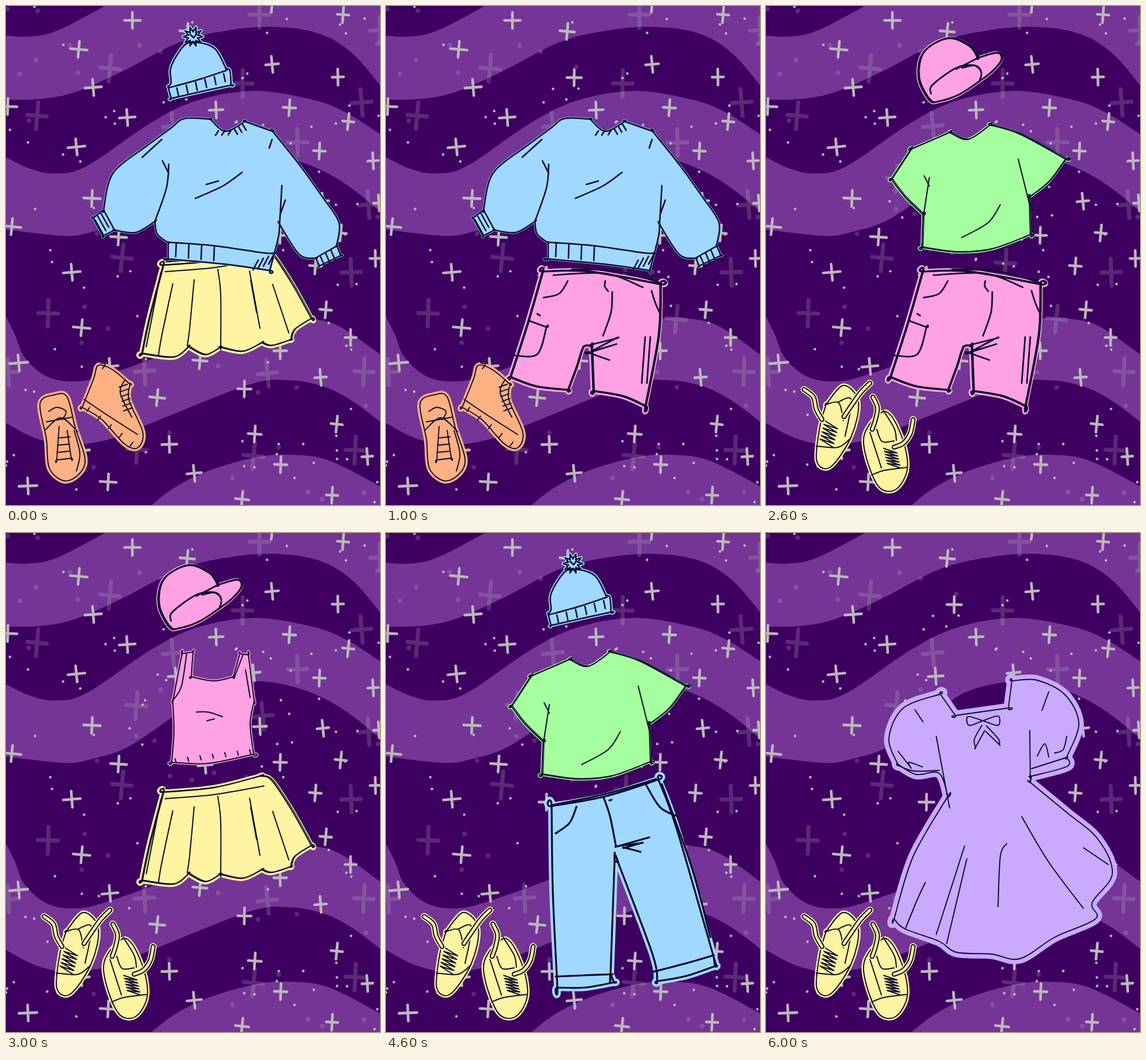
These frames come from a looping animation (648 by 864 pixels, 7000 ms). An HTML page with a canvas:

```html
<!DOCTYPE html>
<html lang="en">
<head>
<meta charset="utf-8">
<title>Outfit shuffle</title>
<style>
html, body { margin: 0; width: 100%; height: 100%; overflow: hidden; background: #3d0060; }
canvas { display: block; width: 648px; height: 864px; }
</style>
</head>
<body>
<canvas id="stage" width="648" height="864"></canvas>
<script>
const ctx = document.getElementById('stage').getContext('2d');
const INK = '#080a2c', BLUE = '#a1d8ff', PINK = '#ffa1e2', YELLOW = '#fff4a1';
const GREEN = '#a6ff9e', LILAC = '#c9aaff', ORANGE = '#ffb083';

const pairs = text => text.trim().split(/\s+/).map(p => p.split(',').map(parseFloat));

// "n:dx,dy a b" gives n ticks between a and b, "n~dx,dy a b" a zigzag.
function addTicks(path, count, kind, step, ends) {
  const [[dx, dy]] = pairs(step), [a, b] = pairs(ends);
  for (let i = 0; i < count; i++) {
    const t = i / (count - 1), x = a[0] + (b[0] - a[0]) * t, y = a[1] + (b[1] - a[1]) * t;
    if (kind === '~' && i) path.lineTo(x, y); else path.moveTo(x, y);
    path.lineTo(x + dx, y + dy);
  }
}

// Smooth path through "x,y" points; "!" marks a corner, "/" starts a new stroke.
function smooth(text, closed = false) {
  const path = new Path2D();
  for (const part of text.split('/').map(s => s.trim())) {
    const ticks = part.match(/^(\d+)([:~])(\S+) (.+)/);
    if (ticks) { addTicks(path, ...ticks.slice(1)); continue; }
    const pts = part.split(/\s+/).flatMap(w => w.endsWith('!') ? pairs(w + ' ' + w) : pairs(w));
    const n = pts.length;
    const at = i => pts[closed ? (i + n) % n : Math.max(0, Math.min(n - 1, i))];
    path.moveTo(...pts[0]);
    for (let i = 0; i < (closed ? n : n - 1); i++) {
      const [a, b, c, d] = [at(i - 1), at(i), at(i + 1), at(i + 2)];
      path.bezierCurveTo(b[0] + (c[0] - a[0]) / 6, b[1] + (c[1] - a[1]) / 6,
        c[0] - (d[0] - b[0]) / 6, c[1] - (d[1] - b[1]) / 6, c[0], c[1]);
    }
  }
  return path;
}

function garment(color, halo, pen, outline, details, { sketchy, laces } = {}) {
  return { color, halo, pen, sketchy, outline: smooth(outline, true), details: smooth(details), laces: laces && smooth(laces) };
}

const bands = [
  '-9,50! 40,53 90,42 175,-2! 660,-2! 660,152! 600,82 540,47 460,36 380,43 300,63 200,114 120,149 60,161 -9,162!',
  `-9,257! 40,281 85,290 140,277 250,203 330,164 430,147 530,162 590,185 660,230!
   660,366! 610,324 560,291 500,267 430,257 345,276 285,321 210,371 150,391 100,398 -9,386!`,
  `-9,520! 15,568 32,608 70,641 120,650 180,637 330,583 400,557 480,541 530,542 580,556 660,612!
   660,729! 600,684 550,659 490,648 420,656 250,723 180,750 110,760 50,748 -9,717!`,
  '248,868! 290,835 350,805 430,782 490,777 560,787 660,838! 660,868!'
].map(b => smooth(b, true));

const stars = pairs(`219,25 126,75 314,44 326,124 151,141 461,101 575,123 584,15 461,-3 3,174 210,193 122,244
  364,180 491,176 593,200 543,251 636,268 429,242 294,248 149,333 10,382 195,400 440,335 549,338 646,341
  475,397 580,393 536,450 640,437 345,402 114,461 278,466 131,557 554,526 597,574 180,624 22,618 475,597
  336,614 262,678 413,663 545,643 130,770 283,759 431,741 573,724 476,794 626,780 326,809 38,831 177,824
  409,854 565,847`);
const faintStars = pairs(`439,15 180,108 54,190 410,134 616,167 289,208 505,236 226,299 201,436 73,532 628,344
  445,317 598,461 415,445 503,542 620,633 240,632 453,636 4,634 605,769 429,779 227,768 648,42`);

let seed = 7;
const random = () => (seed = seed * 16807 % 2147483647) / 2147483647;
const scatter = count => Array.from({ length: count }, () => [random() * 648, random() * 864]);
const dots = scatter(105), faintDots = scatter(36);

const pompom = Array.from({ length: 20 }, (_, i) => {
  const r = i % 2 ? 9 : 16, a = i * Math.PI / 10;
  return `${324 + r * Math.cos(a)},${53 + r * Math.sin(a)}!`;
}).join(' ');

const beanie = garment(BLUE, 6, 2.5,
  '281,140! 286,132 286,105 309,68 331,63 362,74 381,108! 388,112 390,137! 330,150 286,160! /' + pompom,
  '281,142 335,127 383,111 / 6:3,14 296,142 377,117 / 319,49 325,55 / 330,48 326,54');

const cap = garment(PINK, 6, 2.8,
  '283,163 264,124 273,80 315,56 352,69 367,90! 400,81 408,92 392,113 370,130 335,153 300,165',
  '286,152 288,137 330,107 362,103 373,115 370,130 / 330,109 367,90 / 340,107 361,103 372,111', { sketchy: true });

const tee = garment(GREEN, 5, 2,
  `318,219! 350,231 388,206! 440,222 519,265! 490,304 456,331! 458,396! 390,421 330,426 270,418! 272,361!
   240,330 217,300! 251,248!`,
  '283,297 273,362 / 274,294 283,312 / 437,265 457,345 / 406,344 385,375 339,401', { sketchy: true });

const tank = garment(PINK, 5, 2,
  `305,209! 324,206! 321,249! 360,256 394,249! 405,209! 420,211! 430,291! 423,330 429,383! 350,399 287,397!
   291,345 289,291!`,
  '313,209 304,265 290,289 / 396,249 411,210 / 415,237 423,285 / 330,310 350,310 375,318 / 348,325 361,322 / 7:2,7 293,391 422,375');

const sweater = garment(BLUE, 4, 2.5,
  `354,196! 380,217 414,200! 462,217! 510,277 550,333! 577,375 573,414! 580,432! 543,450! 537,437! 508,430 474,378!
   472,400 457,458! 380,447 281,438! 281,410! 262,395 258,373! 225,392 188,388! 168,398! 151,367! 169,353!
   185,290 240,245! 285,212 309,195`,
  `282,274 278,315 258,373 / 271,268 282,290 / 478,311 474,378 / 484,336 475,361 / 169,353 188,388
   / 3:14,25 154,370 164,358 / 537,436 574,415 / 3:7,16 545,434 563,423 / 281,409 360,415 443,427 466,428
   / 4:-1,24 295,410 361,417 / 4:-9,17 437,440 464,430 / 3:-5,8 368,216 390,215 / 3:6,10 395,212 410,205
   / 328,333 375,312 409,288 / 347,309 368,303 / 461,231 456,246 / 236,262 270,231`);

const skirt = garment(YELLOW, 9, 2,
  `272,449! 360,441 440,421! 460,428 495,480 529,541! 500,560 493,578! 460,588 443,583! 410,598 371,591!
   345,604 316,590! 290,608 235,602! 248,540`,
  `276,460 360,453 447,438 / 289,481 270,570 264,606 / 326,474 318,560 314,588 / 367,456 372,500 372,595
   / 422,459 440,558 / 424,475 434,530 / 462,482 490,566 / 268,462 243,590`, { sketchy: true });

const shorts = garment(PINK, 9, 2.7,
  `271,460! 350,460 475,482! 472,570 449,693! 410,676 359,667! 356,590! 342,590 330,625 315,665! 260,659
   215,643! 245,550`,
  `290,466 380,463 445,487 / 322,456 400,459 475,479 / 315,476 300,498 273,505 / 460,493 467,515 476,535
   / 380,476 379,485 385,494 / 392,495 390,530 376,571 / 248,545 278,556! 262,603 222,605 / 262,533 267,536
   / 341,590 397,576! 352,600! 394,587! 350,600! 387,613 / 2:-6,80 449,573 458,573`, { sketchy: true });

const jeans = garment(BLUE, 12, 3.2,
  `287,473! 380,456 472,427! 503,510 568,735! 570,750! 520,767 470,776! 462,730 402,570! 396,568! 389,764! 395,778!
   345,787 297,787! 289,620`,
  `294,768 340,766 393,764 / 462,760 520,745 568,731 / 330,474 318,502 294,520 / 450,435 475,475 506,491
   / 377,458 388,490 398,540 / 456,527 403,542! 441,537! 414,545! 441,552 / 387,463 391,462 / 396,557 396,558
   / 478,435 530,580 562,700 / 288,471 380,452 468,426`);

const dress = garment(LILAC, 17, 1.9,
  `302,279! 328,316! 420,303! 426,256! 470,255 518,280 542,330 521,388! 522,404 460,421! 458,432! 520,483 575,530
   600,590 565,640 571,668 500,700 440,737 390,729 330,726 300,707 240,685 222,668! 255,560 315,456! 300,416
   260,418 228,400! 213,355 238,303`,
  `460,408 523,388 / 228,402 255,412 300,411 / 229,378 250,405! 248,397 271,405 / 295,352 318,476 / 457,342 458,432
   / 470,386 483,365 490,388 / 500,381 515,375 521,352 / 276,605 262,635 242,684 / 344,542 295,695 / 348,564 313,711
   / 417,538 406,560 402,647 / 443,491 490,570 550,650 / 550,545 593,574 / 258,306 272,327 / 490,275 478,307
   / 376,325 350,318 352,333 376,325 402,317 402,333 376,325 / 374,333 361,357 363,371! 379,342
   / 382,334 403,357 404,366! 381,344`);

const boots = garment(ORANGE, 9, 1.9,
  `59,688 85,673 106,677 120,730 137,785 125,812 100,822 75,800 70,750
   / 160,622 185,630 215,655! 213,682 237,738 228,765 205,758 166,716 132,695! 152,645`,
  `74,702 88,695 104,702 98,716 / 70,720 114,712 / 67,735 95,713 124,737 / 118,735 128,775 122,805
   / 92,728 88,786! 113,783! 106,735 / 3:21,-2 90,748 88,773 / 135,681 175,708 228,742 / 206,647 198,670 218,712
   / 6:14,-5 196,660 204,701 / 5:5,-7 140,702 215,762 / 164,618 172,620 167,628`);

const sneakers = garment(YELLOW, 7, 2,
  `104,690! 134,657 160,685 148,745 112,798 88,788 93,730
   / 173,735 207,702 235,745 245,800 225,837 195,832 172,775`,
  `87,762 125,764 147,748 / 104,690! 126,687 134,718 / 124,686 148,682 137,745 / 6~22,14 102,718 94,750
   / 183,812 205,804 243,799 / 180,738 200,800 / 192,733 201,754 222,753 / 203,700 222,731 226,752
   / 6~23,8 204,766 210,792`,
  { laces: '66,664 82,677 87,698 97,716 / 180,653 165,668 152,686 135,711 / 185,677 193,695 190,715 184,733 / 255,716 250,740 238,757 222,764' });

const flats = garment(LILAC, 8, 2,
  '122,627 80,690 57,758 85,753 138,670 143,642! / 155,685 172,673 191,692 208,790 183,835 153,800',
  '115,632 138,656 / 134,636 103,710 66,733 / 165,757 160,695 184,691 200,765 / 157,770 178,808 202,772');

const outfits = [
  [beanie, skirt, sweater, boots],
  [shorts, sweater, boots],
  [cap, tee, shorts, sneakers],
  [cap, tank, skirt, sneakers],
  [beanie, tee, jeans, sneakers],
  [tank, shorts, flats],
  [dress, sneakers]
];

function stroke(path, color, width) {
  ctx.strokeStyle = color;
  ctx.lineWidth = width;
  ctx.stroke(path);
}

function drawStars(list, color, halfWidth, halfHeight, width) {
  list.forEach(([x, y], i) => {
    const tilt = Math.sin(i * 7.3) * 0.1, w = halfWidth(x);
    const cross = new Path2D();
    cross.moveTo(x - w, y - w * tilt);
    cross.lineTo(x + w, y + w * tilt);
    cross.moveTo(x + halfHeight * tilt, y - halfHeight);
    cross.lineTo(x - halfHeight * tilt, y + halfHeight);
    stroke(cross, color, width);
  });
}

function drawDots(list, color, radius) {
  ctx.fillStyle = color;
  for (const [x, y] of list) {
    ctx.beginPath();
    ctx.arc(x, y, radius, 0, 7);
    ctx.fill();
  }
}

function drawSky() {
  ctx.fillStyle = '#3d0060';
  ctx.fillRect(0, 0, 648, 864);
  ctx.fillStyle = '#743596';
  bands.forEach(b => ctx.fill(b));
  const faint = 'rgba(190,190,190,0.22)', bright = '#bcb8bd';
  drawStars(faintStars, faint, () => 17, 23, 7);
  drawDots(faintDots, faint, 4);
  drawStars(stars, bright, x => 16 - x / 95, 14, 4.6);
  drawDots(dots, bright, 2.2);
}

function drawGarment({ color, halo, pen, outline, details, sketchy, laces }) {
  ctx.fillStyle = color;
  ctx.fill(outline);
  stroke(outline, color, halo);
  stroke(outline, INK, pen);
  stroke(details, INK, pen);
  if (sketchy) {
    ctx.save();
    ctx.translate(2, -1);
    stroke(outline, INK, pen * 0.7);
    ctx.restore();
  }
  if (laces) {
    stroke(laces, color, 12);
    stroke(laces, INK, 8.5);
    stroke(laces, color, 4.5);
  }
}

ctx.lineCap = ctx.lineJoin = 'round';
const start = performance.now();
let shown = -1;

function tick() {
  const current = Math.floor((performance.now() - start) / 1000) % outfits.length;
  if (current !== shown) {
    shown = current;
    drawSky();
    outfits[current].forEach(drawGarment);
  }
  requestAnimationFrame(tick);
}
tick();
</script>
</body>
</html>
```
